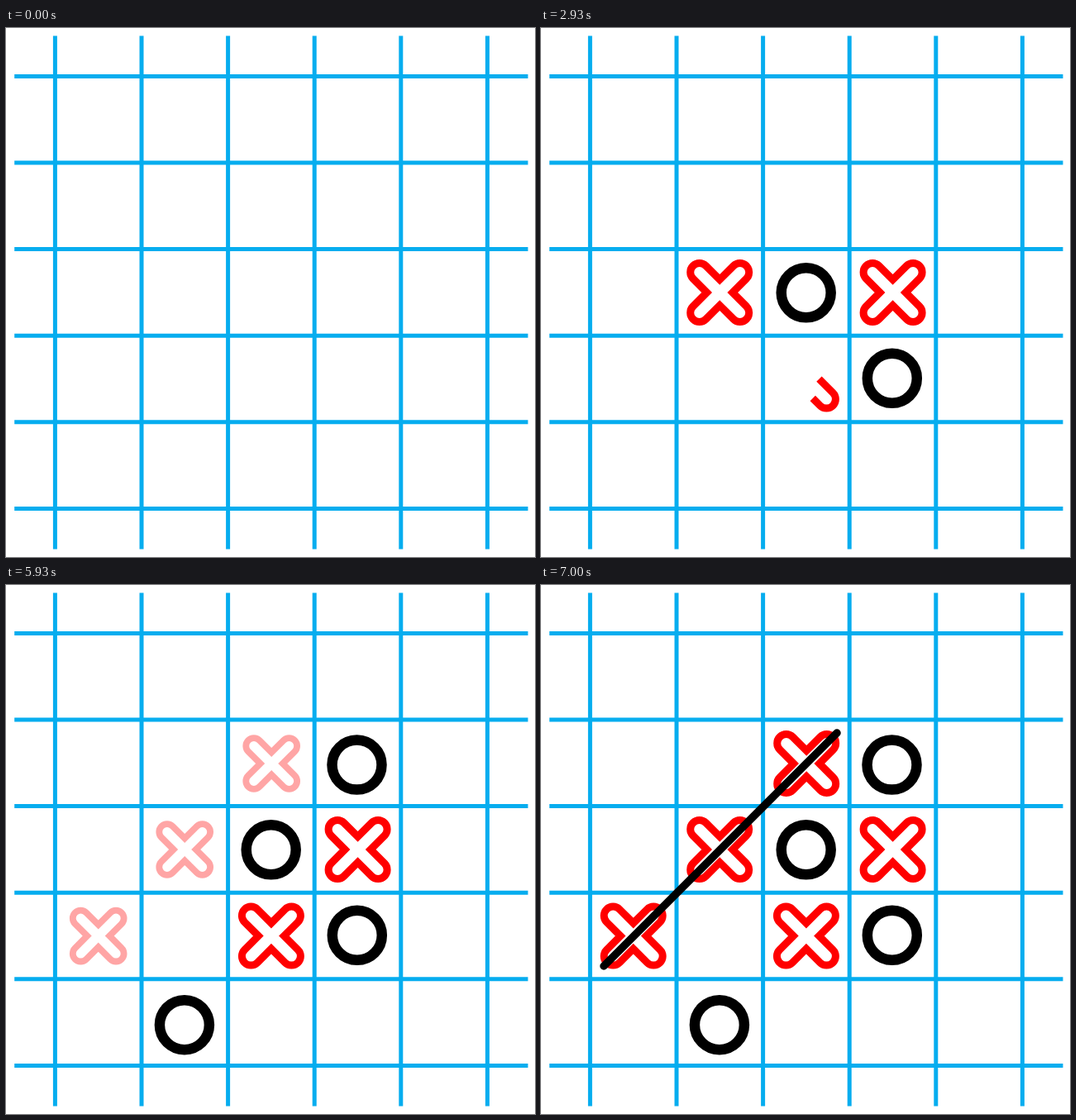
An HTML page that plays this animation: 640 by 640 pixels, repeating every 7210 ms.

```html
<!DOCTYPE html>
<html lang="en">
<head>
<meta charset="utf-8">
<title>Noughts and crosses</title>
<style>
  html, body { margin: 0; height: 100%; overflow: hidden; background: #fff; }
  svg { display: block; width: 100vw; height: 100vh; }
</style>
</head>
<body>
<svg id="board" viewBox="0 0 640 640" fill="none"></svg>
<script>
const LOOP = 7210, STEP = 40, DRAW = 400;
const CROSS = 'M15.56 0L32.28 16.72A11 11 0 0 1 16.72 32.28L0 15.56' +
  'L-16.72 32.28A11 11 0 0 1 -32.28 16.72L-15.56 0' +
  'L-32.28 -16.72A11 11 0 0 1 -16.72 -32.28L0 -15.56' +
  'L16.72 -32.28A11 11 0 0 1 32.28 -16.72Z';

// Crosses and noughts take turns, crosses first.
const MOVES = [
  [216.2, 320], [320.7, 320.3], [425.6, 320], [424.8, 423.8], [320.9, 424.6],
  [215.9, 532.2], [321.2, 216], [424.5, 217.6], [111.7, 424.6]
];
const WINNERS = [0, 6, 8];

const board = document.getElementById('board');

function add(name, attrs) {
  const el = document.createElementNS('http://www.w3.org/2000/svg', name);
  for (const key in attrs) el.setAttribute(key, attrs[key]);
  return board.appendChild(el);
}

let grid = '';
for (let i = 0; i < 6; i++) {
  const d = i * 104.6;
  grid += `M${59.4 + d} 9.5V630.5M10.2 ${58.4 + d}H631.5`;
}
add('path', { d: grid, stroke: '#06adef', 'stroke-width': 5 });

const marks = MOVES.map((_, i) => i % 2
  ? add('circle', { r: 30, stroke: '#000', 'stroke-width': 12.5, pathLength: 1 })
  : add('path', { d: CROSS, stroke: '#f00', 'stroke-width': 9, 'stroke-miterlimit': 10, pathLength: 1 }));
const strike = add('path', { stroke: '#000', 'stroke-width': 9.5, 'stroke-linecap': 'round' });

function ease(p) {
  p = Math.min(1, Math.max(0, p));
  return p * p * (3 - 2 * p);
}

// Dips from 1 to 0 and back, three times.
function blink(t) {
  if (t <= 0 || t >= 3 * DRAW) return 1;
  return ease(Math.abs(1 - (t % DRAW) / (DRAW / 2)));
}

function render(now) {
  const t = Math.floor((now % LOOP + 10) / STEP) * STEP - 10;
  const glow = blink(t - 5790);

  marks.forEach((mark, i) => {
    const p = ease((t - 390 - 600 * i) / DRAW);
    const pulse = WINNERS.includes(i) ? glow : 1;
    const [x, y] = MOVES[i];
    mark.setAttribute('visibility', p > 0 ? 'visible' : 'hidden');
    mark.setAttribute('stroke-dasharray', p < 1 ? `${p} 2` : 'none');
    mark.setAttribute('opacity', pulse);
    mark.setAttribute('transform', `translate(${x} ${y}) scale(${0.8 + 0.2 * pulse})`);
  });

  const d = 282 * ease((t - 6190) / DRAW);
  strike.setAttribute('visibility', d > 0 ? 'visible' : 'hidden');
  strike.setAttribute('d', `M76 461l${d} ${-d}`);
}

const start = performance.now();
function tick() {
  render(performance.now() - start);
  requestAnimationFrame(tick);
}
tick();
</script>
</body>
</html>
```
